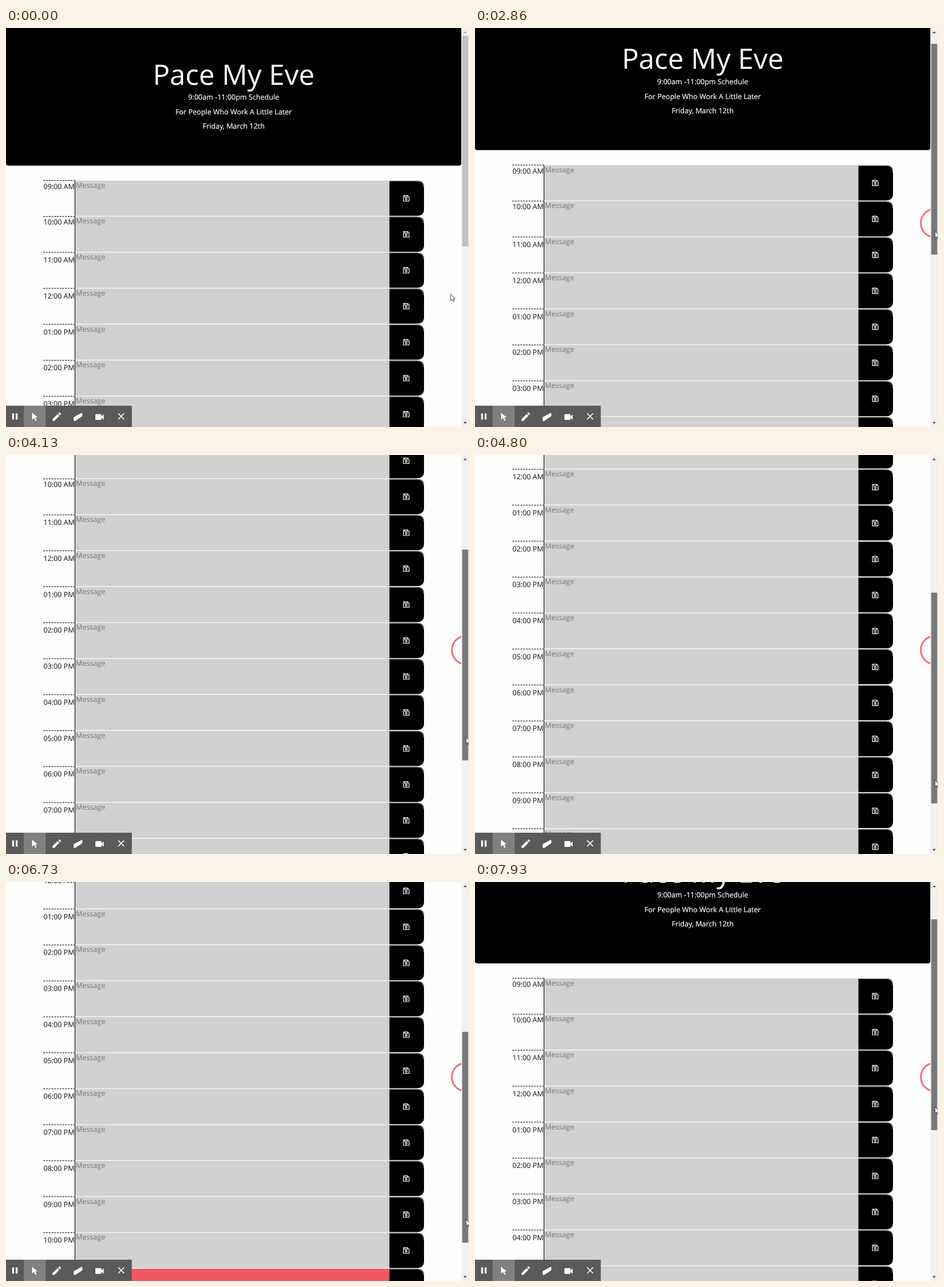
These frames come from a looping animation (782x674 px, 8000 ms). An HTML page:

```html
<!DOCTYPE html>
<html lang="en">
<head>
<meta charset="utf-8">
<title>Day planner</title>
<style>
  html, body { margin: 0; width: 100%; height: 100%; overflow: hidden; background: #fdfdfd; }
  svg { display: block; width: 782px; height: 674px; }
  text { font-family: "Open Sans", "Noto Sans", sans-serif; font-size: 12.15px; text-rendering: geometricPrecision; }
  .head { fill: #fff; text-anchor: middle; stroke: #fff; stroke-width: .2; }
  .title { font-size: 47.6px; stroke: none; }
  .hour { fill: #212529; stroke: #212529; stroke-width: .1; }
  .hint { fill: #757575; }
  .now .hint { fill: #a05f62; }
  .slot { fill: #d1d1d1; }
  .now .slot { fill: #f05862; }
</style>
</head>
<body>
<svg viewBox="0 0 782 674">
  <defs>
    <clipPath id="view"><rect width="769" height="674"/></clipPath>
    <g id="disk" fill="none" stroke="#fff" stroke-width="1.2">
      <path d="M-4.7 -4.7H2.4L4.7 -2.4V4.7H-4.7Z" stroke-linejoin="round"/>
      <path d="M-2.5 -4.5V-1.7H1.7V-4.5"/>
      <circle cy="1.5" r="1.5"/>
    </g>
  </defs>
  <rect width="782" height="674" fill="#fdfdfd"/>

  <g clip-path="url(#view)">
    <g id="page">
      <rect y="-4" width="769" height="236.4" rx="3.8"/>
      <rect width="769" height="20" rx="3.8"/>
      <text class="head title" x="384.5" y="95.5">Pace My Eve</text>
      <text class="head" x="384.5" y="121.3">9:00am -11:00pm Schedule</text>
      <text class="head" x="384.5" y="145.6">For People Who Work A Little Later</text>
      <text class="head" x="384.5" y="169.9">Friday, March 12th</text>
      <g id="rows"></g>
    </g>
    <circle id="ring" cx="777" cy="329.5" r="24" fill="none" stroke="#f0727f" stroke-width="3"/>
  </g>

  <rect x="769" width="13" height="674" fill="#f1f1f1"/>
  <path id="up" d="M772.5 8.7l3 -3.2l3 3.2Z"/>
  <path d="M772.5 665.5l3 3.2l3 -3.2Z" fill="#505050"/>
  <rect id="thumb" x="770.5" width="10.2" height="356"/>

  <g fill="#fff">
    <rect y="638" width="212.5" height="36" fill="#5a5a5a"/>
    <rect x="30" y="638" width="37" height="36" fill="#808080"/>
    <path d="M10.5 651h3v10.5h-3zM16.5 651h3v10.5h-3z"/>
    <path d="M44 650l9.5 7.7h-4.1l2.3 5l-2.1 .9l-2.3 -5l-3.3 2.9Z"/>
    <path d="M-9.4 0l2.2 -2.1H5v4.2H-7.2ZM6.4 -2.1H8.4q1 0 1 1v2.2q0 1 -1 1H6.4Z" transform="translate(85.2 657.1) rotate(-45)"/>
    <path d="M115 657l12.5 -6.7q1.5 -.5 1.5 .9v3.8l-1 1.6l-11.5 7.4q-1.5 .5 -1.9 -1l-.6 -3.5q0 -1.7 1 -2.5Z"/>
    <rect x="151" y="652.3" width="10.3" height="9.7" rx="1"/>
    <path d="M161 656.4l4 -3.6v8.9l-4 -3.6Z"/>
    <path d="M189.5 651l10 10m0 -10l-10 10" stroke="#fff" stroke-width="1.6"/>
  </g>

  <path id="cursor" d="M0 0V11.3L2.6 9L4.3 12.8L6 12L4.3 8.3H7.6Z" fill="#fff" stroke="#20203a" stroke-width=".8"/>
</svg>
<script>
const el = id => document.getElementById(id);
const LOOP = 8000, STEP = 1000 / 15;
const FIRST = 257.6, PITCH = 60.75, ROWS = 15;
const PRESS = 2400, GRAB_Y = 329.5, TRACK = 0.528;

const hourLabel = i =>
  `${String((i + 8) % 12 + 1).padStart(2, "0")}:00 ${i < 4 ? "AM" : "PM"}`;

function row(i) {
  // the labels of the first two hours sit higher than the rest
  const labelY = i < 2 ? 14 : 17;
  return `<g transform="translate(0 ${FIRST + i * PITCH})" class="${i === ROWS - 1 ? "now" : ""}">
    <path d="M63 0H116" stroke="#000" stroke-dasharray="3 1.6"/>
    <text class="hour" x="63.2" y="${labelY}">${hourLabel(i)}</text>
    <rect class="slot" x="117" y=".2" width="531" height="59.6"/>
    <path d="M116.5 0V60" stroke="#000"/>
    <text class="hint" x="118" y="12">Message</text>
    <path d="M647.6 .4H694.5Q706 .4 706 11.5V48.5Q706 59.6 694.5 59.6H647.6Z"/>
    <path d="M648 1H694.5Q705.4 1 705.4 12" fill="none" stroke="#666" stroke-width="1.2"/>
    <use href="#disk" x="676" y="30.2"/>
  </g>`;
}
el("rows").innerHTML = Array.from({ length: ROWS }, (_, i) => row(i)).join("");

// each drag of the scrollbar: start, end, scroll offset reached
const drags = [
  [PRESS, 2860, 26], [2860, 3530, 150], [3735, 4260, 300], [4395, 5130, 501],
  [5265, 6060, 553], [6335, 6730, 455], [6935, 7260, 250], [7400, 7730, 95]
];

function ease(t, from, to) {
  const u = Math.min(1, Math.max(0, (t - from) / (to - from)));
  return u * u * (3 - 2 * u);
}
const scrollAt = t =>
  drags.reduce((s, [from, to, goal]) => s + (goal - s) * ease(t, from, to), 0);

function draw(ms) {
  // the picture advances 15 times per second
  const t = Math.floor((ms % LOOP + 7) / STEP) * STEP % LOOP;
  const scroll = scrollAt(t);
  const reach = ease(t, 1530, 2000);
  const x = 751 + 26 * reach;
  const y = GRAB_Y + 120 * (1 - reach) + scroll * TRACK;
  const pressed = t >= PRESS;
  el("page").setAttribute("transform", `translate(0 ${-scroll})`);
  el("thumb").setAttribute("y", 13 + scroll * TRACK);
  el("thumb").setAttribute("fill", pressed ? "#787878" : x >= 769 ? "#a8a8a8" : "#c1c1c1");
  el("up").setAttribute("fill", scroll > 0 ? "#505050" : "#a3a3a3");
  el("ring").setAttribute("visibility", pressed ? "visible" : "hidden");
  el("cursor").setAttribute("transform", `translate(${x} ${y})`);
}

const start = performance.now();
function tick() {
  draw(performance.now() - start);
  requestAnimationFrame(tick);
}
tick();
</script>
</body>
</html>
```
